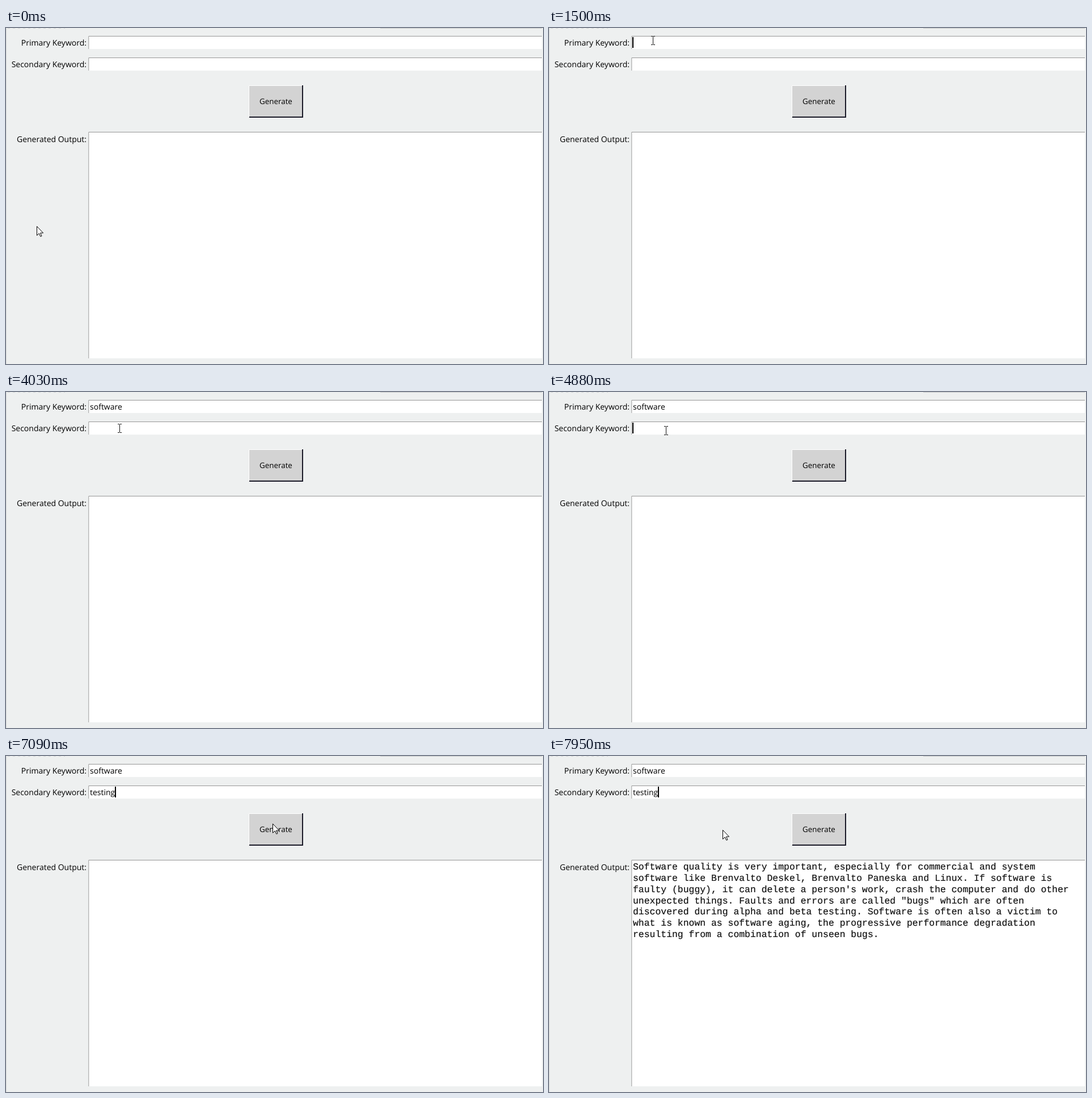
Recreate the animation shown at these times as an HTML page. Size 947 by 592 pixels, loop 8000 ms.

```html
<!DOCTYPE html>
<html lang="en">
<head>
<meta charset="utf-8">
<title>Text generator</title>
<style>
  html, body { margin: 0; width: 100%; height: 100%; overflow: hidden; background: #eef0f0; }
  svg { display: block; width: 947px; height: 592px; }
  text { font: 14px "Open Sans", "Noto Sans", sans-serif; text-rendering: geometricPrecision; }
  .label { text-anchor: end; }
  .button { font-size: 13.4px; }
  .output text { font: 16.43px "Liberation Mono", monospace; fill: #111; stroke: #111; stroke-width: .2; white-space: pre; }
  .field { fill: #fff; }
  .edge { fill: none; stroke: #969696; }
</style>
</head>
<body>
<svg viewBox="0 0 947 592">
  <rect width="947" height="592" fill="#eef0f0"/>
  <path d="M.5 0V592" stroke="#d9dbdb"/>
  <path d="M660 .5H945" stroke="#c9cbcb"/>
  <path d="M3 .5H104" stroke="#d4d6d6" stroke-dasharray="4 5"/>

  <g id="fields"></g>

  <text class="label" x="142" y="31">Primary Keyword:</text>
  <text class="label" x="142" y="69">Secondary Keyword:</text>
  <text class="label" x="142" y="201">Generated Output:</text>

  <g id="raised">
    <rect x="428" y="101" width="96" height="57" fill="#d3d3d3"/>
    <path d="M428.5 157V101.5H523" fill="none" stroke="#fff"/>
    <path d="M429 157H523V101" fill="none" stroke="#1a1a28" stroke-width="2"/>
    <text class="button" x="447" y="134">Generate</text>
  </g>
  <g id="sunken">
    <rect x="428" y="101" width="96" height="57" fill="#f0f0f0"/>
    <path d="M429 157V102H523" fill="none" stroke="#777" stroke-width="2"/>
    <path d="M429 157H523V102" fill="none" stroke="#fff" stroke-width="2"/>
    <text class="button" x="448" y="135">Generate</text>
  </g>

  <text id="primary" x="148" y="31"></text>
  <text id="secondary" x="148" y="69"></text>
  <g id="output" class="output"></g>
  <rect id="caret" width="2" height="19"/>

  <path id="arrow" d="M.5 .5V16.5L4.3 12.9L6.8 18.4L9 17.5L6.6 12.1H11.6Z" fill="#fff" stroke="#000"/>
  <path id="beam" d="M-3 -7.5H0M1 -7.5H4M.5 -7V7M-3 7.5H0M1 7.5H4" fill="none" stroke="#111"/>
</svg>
<script>
const LOOP = 8000, LEFT = 148, STEP = 80;
const PRESS = 7240, DONE = 7950;
const $ = id => document.getElementById(id);
const show = (id, on) => $(id).style.display = on ? '' : 'none';

const fields = [[14, 37], [52, 75], [183, 582]];
$('fields').innerHTML = fields.map(([top, bottom]) =>
  `<rect class="field" x="145" y="${top}" width="800" height="${bottom - top}"/>` +
  `<path class="edge" d="M145.8 ${bottom}V${top + .5}H945"/>`).join('');

const lines = [
  'Software quality is very important, especially for commercial and system',
  'software like Brenvalto Deskel, Brenvalto Paneska and Linux. If software is',
  "faulty (buggy), it can delete a person's work, crash the computer and do other",
  'unexpected things. Faults and errors are called "bugs" which are often',
  'discovered during alpha and beta testing. Software is often also a victim to',
  'what is known as software aging, the progressive performance degradation',
  'resulting from a combination of unseen bugs.'
];
$('output').innerHTML = lines.map((line, i) =>
  `<text x="${LEFT}" y="${200.4 + i * 19.7}">${line}</text>`).join('');

// Each glide starts where the last one ended; `via` bends it
const glides = [
  { start: 0, to: [54, 349] },
  { start: 480, to: [60, 191] },
  { start: 560, to: [165, -22] },
  { start: 800, end: 1250, to: [177, 8] },
  { start: 1340, end: 1500, to: [183, 22] },
  { start: 3720, end: 4350, to: [205, 78] },
  { start: 4420, end: 4770, to: [206, 68] },
  { start: 6530, end: 7090, to: [470, 119] },
  { start: 7410, end: DONE, to: [306, 130], via: [373, 140] }
];

// Bursts of typing: letters appear one per gap
const inputs = [
  { id: 'primary', focus: 1500, caretY: 16, bursts: [
    { text: 's', start: 1980, gap: 0 },
    { text: 'of', start: 2280, gap: 80 },
    { text: 'tware', start: 2670, gap: 145 }] },
  { id: 'secondary', focus: 4770, caretY: 54, bursts: [
    { text: 'test', start: 5050, gap: 127 },
    { text: 'ing', start: 5830, gap: 85 }] }
];
for (const input of inputs)
  input.keys = input.bursts.flatMap(({ text, start, gap }) =>
    [...text].map((char, i) => ({ char, time: start + i * gap })));

function pointerAt(t) {
  const i = glides.findLastIndex(g => g.start <= t);
  const { start, end = start, to, via } = glides[i];
  if (end === start) return to;
  const from = glides[i - 1].to;
  const steps = Math.round((end - start) / STEP);
  const done = Math.floor((t - start + 10) / (end - start) * steps);
  const u = Math.min(1, done / steps);
  const s = 1 - (1 - u) ** 2;
  return from.map((a, k) => {
    const b = to[k], c = via ? via[k] : (a + b) / 2;
    return Math.round((1 - s) ** 2 * a + 2 * s * (1 - s) * c + s * s * b);
  });
}

function drawInputs(t) {
  show('caret', false);
  for (const { id, focus, caretY, keys } of inputs) {
    const typed = keys.filter(key => key.time <= t);
    $(id).textContent = typed.map(key => key.char).join('');
    if (t < focus) continue;
    // The caret blinks, restarting at every key
    const active = typed.length ? typed[typed.length - 1].time : focus;
    show('caret', (t - active) % 900 < 600);
    $('caret').setAttribute('x', Math.ceil(LEFT + $(id).getComputedTextLength() - 1));
    $('caret').setAttribute('y', caretY);
  }
}

function drawPointer(t) {
  const [x, y] = pointerAt(t);
  const inField = x > 145 && fields.some(([top, bottom]) => y >= top && y <= bottom);
  show('beam', inField);
  show('arrow', !inField);
  $(inField ? 'beam' : 'arrow').setAttribute('transform', `translate(${x} ${y})`);
}

function tick() {
  const t = performance.now() % LOOP;
  const pressed = t >= PRESS && t < DONE;
  show('sunken', pressed);
  show('raised', !pressed);
  show('output', t >= DONE);
  drawInputs(t);
  drawPointer(t);
  requestAnimationFrame(tick);
}
tick();
</script>
</body>
</html>
```
